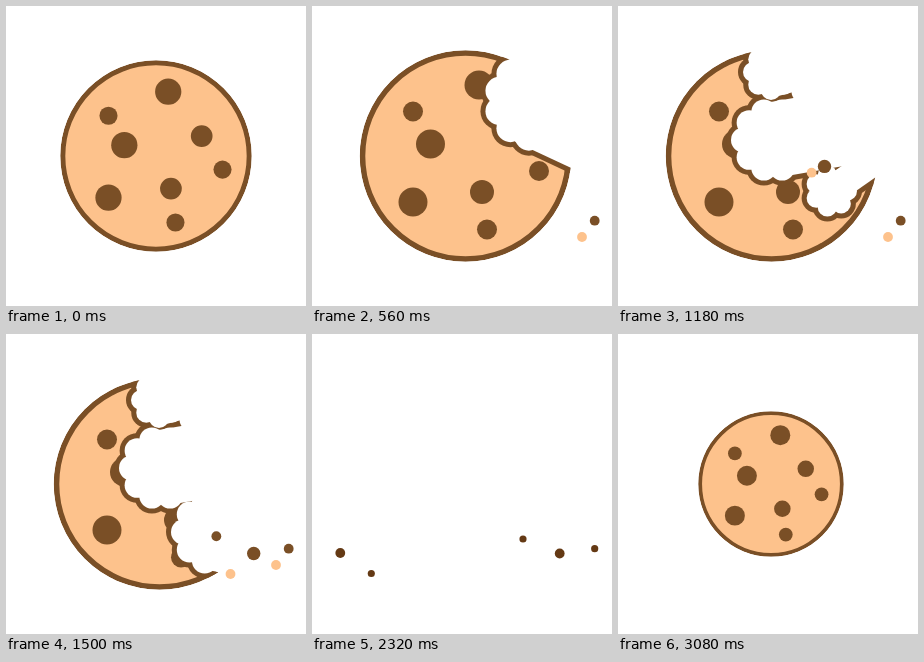
An HTML page that plays this animation: 300 by 300 pixels, repeating every 3.1 s.

```html
<!DOCTYPE html>
<html lang="en">
<head>
<meta charset="utf-8">
<title>Cookie</title>
<style>
  html, body { margin: 0; width: 100%; height: 100%; overflow: hidden; background: #fff; }
  svg { display: block; width: 100vw; height: 100vh; }
</style>
</head>
<body>
<svg viewBox="0 0 300 300">
  <defs><clipPath id="disc"><circle r="105.8"/></clipPath></defs>
  <g id="cookie">
    <g id="dough" clip-path="url(#disc)">
      <circle r="103" fill="#fdc28c" stroke="#7a4f26" stroke-width="5.6"/>
    </g>
  </g>
  <g id="holes"></g>
  <g id="crumbs"></g>
</svg>
<script>
const LOOP = 3100, STEP = 20;
const EATEN = 1860, REGROW = 2860;
const PEACH = '#fdc28c', BROWN = '#7a4f26', DARK = '#643914';
const CX = 153.5, CY = 150, RIM = 5;
const $ = id => document.getElementById(id);
const clamp = x => Math.max(0, Math.min(1, x));
const mix = (a, b, p) => a + (b - a) * p;
const easeOut = x => 1 - (1 - clamp(x)) ** 3;

function set(el, attrs) {
  for (const key in attrs) el.setAttribute(key, attrs[key]);
  return el;
}
function add(parent, tag, attrs) {
  const el = document.createElementNS('http://www.w3.org/2000/svg', tag);
  return parent.appendChild(set(el, attrs));
}
const show = (el, on) => set(el, { display: on ? 'inline' : 'none' });

const chip = (r, ...spots) => spots.forEach(([cx, cy]) =>
  add($('dough'), 'circle', { cx, cy, r, fill: BROWN }));
chip(14.5, [13.5, -71], [-35, -12], [-52.5, 46]);
chip(12, [50.5, -22], [16.5, 36]);
chip(10, [-52.5, -44.5], [73.5, 15], [21.5, 73.5]);

// A bite is a scalloped disc with a neck that leads out of the cookie at an angle.
const bites = [
  { at: 340, x: 222, y: 95, r: 50, angle: 25 },
  { at: 740, x: 213, y: 185, r: 26, angle: -35, neck: .55 },
  { at: 1060, x: 153, y: 66, r: 28, angle: -15 },
  { at: 1060, x: 155, y: 134, r: 42, angle: -10 },
  { at: 1340, x: 208, y: 198, r: 43, angle: 10 },
  { at: 1540, x: 88, y: 74, r: 42, angle: -90 },
  { at: 1670, x: 100, y: 150, r: 50, angle: -45 },
  { at: 1780, x: 115, y: 205, r: 95, angle: -90 }
];

function biteShape(parent, { x, y, r, neck = .9, out }, color, grow) {
  const group = add(parent, 'g', { fill: color });
  const disc = (cx, cy, r) => add(group, 'circle', { cx, cy, r: r + grow });
  const bump = 5 + .18 * r, ring = r - bump;
  const count = Math.round(2 * Math.PI * ring / (1.45 * bump));
  disc(x, y, ring);
  for (let i = 0; i < count; i++) {
    const a = 2 * Math.PI * i / count;
    disc(x + ring * Math.cos(a), y + ring * Math.sin(a), bump);
  }
  add(group, 'path', {
    d: `M${x} ${y}l${120 * out[0]} ${120 * out[1]}`,
    stroke: color, 'stroke-width': 2 * (neck * r + grow)
  });
  return group;
}
for (const bite of bites) {
  const a = bite.angle * Math.PI / 180;
  bite.out = [Math.cos(a), Math.sin(a)];
  bite.rim = biteShape($('dough'), bite, BROWN, RIM);
  bite.hole = biteShape($('holes'), bite, '#fff', 0);
}

// Crumbs fall from the centre of their bite to a landing point.
const crumbs = [
  { bite: 0, x: 282.7, y: 214.7, r: 4.9, fill: BROWN },
  { bite: 0, x: 270, y: 231, r: 4.9, fill: PEACH },
  { bite: 3, x: 247.7, y: 219.5, r: 6.7, fill: BROWN },
  { bite: 3, x: 224.5, y: 240, r: 4.9, fill: PEACH },
  { bite: 4, x: 211, y: 205, r: 4.9, fill: BROWN },
  { bite: 6, x: 28.3, y: 219, r: 6.7, fill: BROWN },
  { bite: 6, x: 59.3, y: 239.5, r: 4.9, fill: BROWN }
];
crumbs.forEach(c => c.el = add($('crumbs'), 'circle', {}));

function cookiePose(t) {
  if (t >= REGROW) return { x: 153, scale: .688 * (t - REGROW + 10) / 230 };
  const p = easeOut(t / 120);
  return { x: mix(150, CX, p), scale: mix(.905, 1, p) };
}

function drawBite({ at, out, rim, hole }, t) {
  const left = 80 * (1 - easeOut((t - at) / 100));
  const [dx, dy] = out.map(v => v * left);
  set(hole, { transform: `translate(${dx} ${dy})` });
  set(rim, { transform: `translate(${dx - CX} ${dy - CY})` });
  [rim, hole].forEach(el => show(el, t >= at && t < REGROW));
}

function drawCrumb({ el, bite, x, y, r, fill }, t) {
  const from = bites[bite], start = from.at + 20;
  const p = clamp((t - start) / 180);
  const shrink = 1 - clamp((t - 2180) / 520);
  const late = t >= EATEN;
  show(el, t >= start && shrink > 0 && !(late && fill === PEACH));
  set(el, {
    cx: mix(from.x, x, p),
    cy: mix(from.y, y, p * p),
    r: r * shrink,
    fill: late ? DARK : fill
  });
}

function draw(t) {
  const { x, scale } = cookiePose(t);
  show($('cookie'), t < EATEN || t >= REGROW);
  set($('cookie'), { transform: `translate(${x} ${CY}) scale(${scale})` });
  bites.forEach(b => drawBite(b, t));
  crumbs.forEach(c => drawCrumb(c, t));
}

const start = performance.now();
function tick() {
  const t = (performance.now() - start) % LOOP;
  draw(Math.floor(t / STEP) * STEP);
  requestAnimationFrame(tick);
}
draw(0);
requestAnimationFrame(tick);
</script>
</body>
</html>
```
